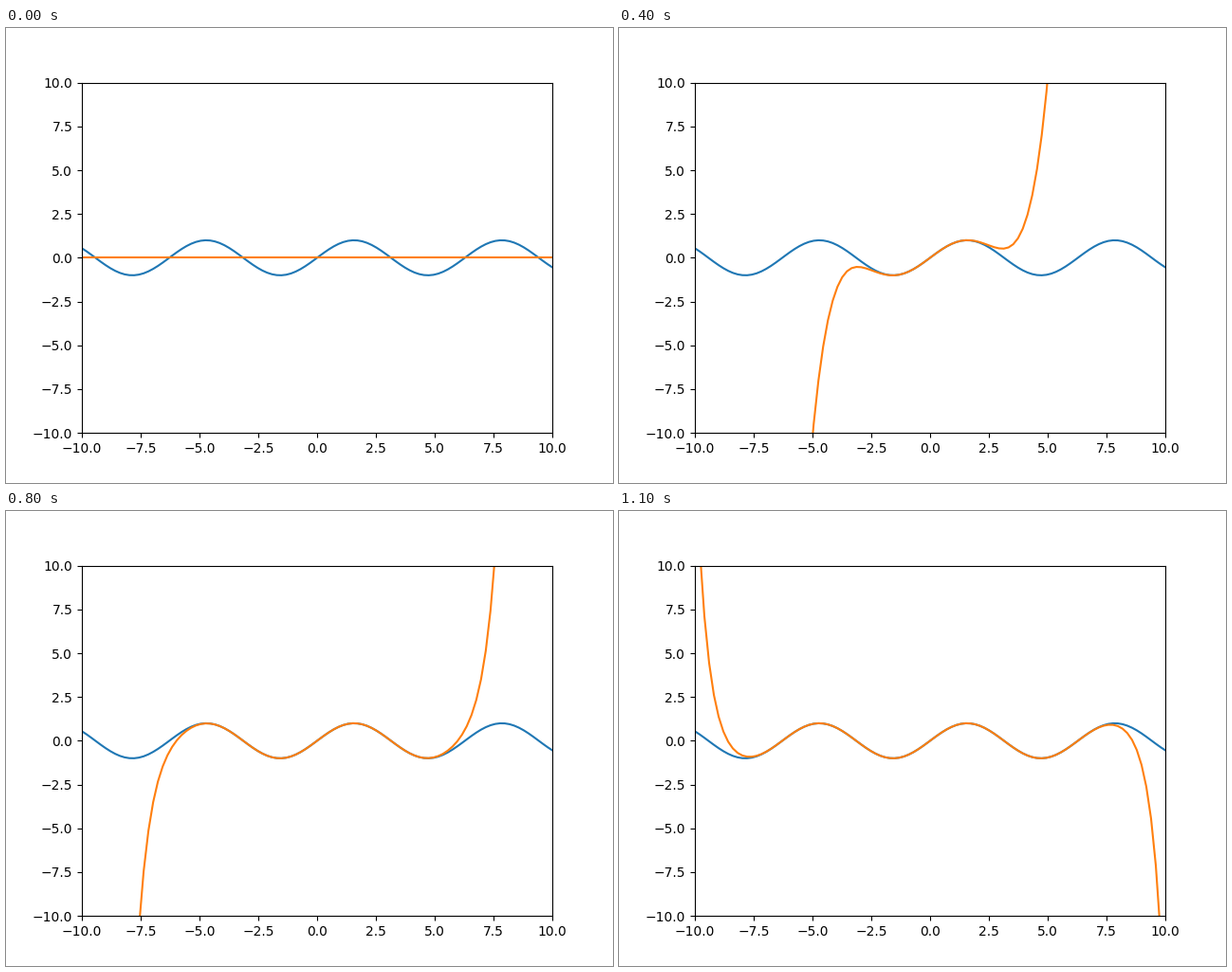
These frames come from a looping animation (640 px wide and 480 px high, 1200 ms). A matplotlib script:

```python
from math import factorial

import matplotlib.pyplot as plt
import numpy as np
from matplotlib.animation import FuncAnimation

FRAMES = 12
INTERVAL = 100

x = np.linspace(-10, 10, 100)


def taylor_sin(x, terms):
    """Partial sum of the Taylor series of sin around zero."""
    total = np.zeros_like(x)
    for k in range(terms):
        n = 2 * k + 1
        total += (-1) ** k * x ** n / factorial(n)
    return total


fig, ax = plt.subplots(figsize=(6.4, 4.8), dpi=100)
ax.set_xlim(-10, 10)
ax.set_ylim(-10, 10)
ax.plot(x, np.sin(x))
approx, = ax.plot(x, np.zeros_like(x))


def update(i):
    # The flat line holds for two steps, then one term is added per step.
    approx.set_ydata(taylor_sin(x, max(0, i - 1)))
    return approx,


anim = FuncAnimation(fig, update, frames=FRAMES, interval=INTERVAL,
                     repeat=True, repeat_delay=0)
plt.show()
```
